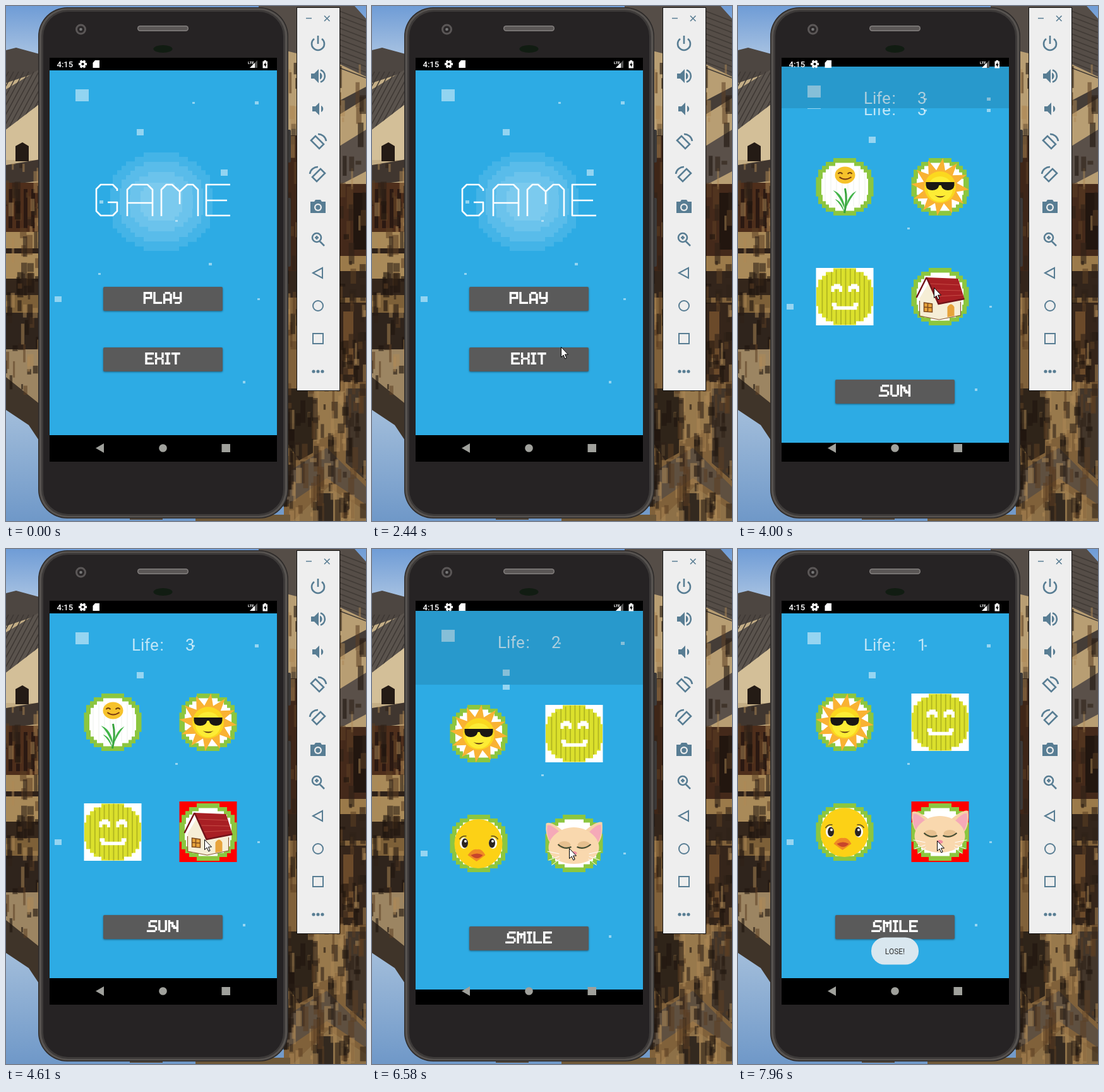
These frames come from a looping animation (570 by 816 pixels, 8 s). An HTML page with a canvas:

```html
<!DOCTYPE html>
<html lang="en">
<head>
<meta charset="utf-8">
<title>Picture game</title>
<style>
html, body { margin: 0; width: 570px; height: 816px; overflow: hidden; }
canvas { display: block; }
</style>
</head>
<body>
<canvas id="stage" width="570" height="816"></canvas>
<script>
const c = document.getElementById('stage').getContext('2d');
const LOOP = 8000;

// ---- drawing helpers ----
function fill(color, path) { c.fillStyle = color; c.fill(new Path2D(path)); }
function line(color, width, path) {
  c.strokeStyle = color; c.lineWidth = width; c.stroke(new Path2D(path));
}
function rect(color, x, y, w, h) { c.fillStyle = color; c.fillRect(x, y, w, h); }
function oval(color, x, y, rx, ry = rx) {
  c.fillStyle = color;
  c.beginPath(); c.ellipse(x, y, rx, ry, 0, 0, 7); c.fill();
}
function round(color, x, y, w, h, r) {
  c.fillStyle = color;
  c.beginPath(); c.roundRect(x, y, w, h, r); c.fill();
}
function text(str, x, y, font, color, align = 'left') {
  c.font = font + ' Roboto, sans-serif';
  c.fillStyle = color; c.textAlign = align; c.fillText(str, x, y);
}
function at(x, y, draw) { c.save(); c.translate(x, y); draw(); c.restore(); }
// disc made of stepped rows
function blocky(color, x, y, rx, ry, step) {
  c.fillStyle = color;
  c.beginPath();
  const rows = Math.round(2 * ry / step), h = 2 * ry / rows;
  for (let i = 0; i < rows; i++) {
    const v = (i + .5) * h / ry - 1;
    const w = Math.min(rx, Math.ceil(rx * Math.sqrt(1 - v * v) / step) * step);
    c.rect(x - w, y - ry + i * h, 2 * w, h + .05);
  }
  c.fill();
}

// ---- pixel lettering: [width in cells, strokes] ----
const GLYPHS = {
  A: [5, 'M0 6V1M1 0H3M4 1V6M0 4H4'], C: [4, 'M3 0H1M0 1V5M1 6H3'],
  E: [5, 'M4 0H0V6H4M0 3H3'], F: [5, 'M4 0H0V6M0 3H3'],
  H: [5, 'M0 0V6M4 0V6M0 3H4'], I: [3, 'M0 0H2M1 0V6M0 6H2'],
  L: [5, 'M0 0V6H4'], M: [5, 'M0 6V0M4 6V0M1 1H3M2 1V3'],
  N: [6, 'M0 6V0M1 1H2V3H3V4H5M5 0V6'], P: [5, 'M0 6V0H4V3H0'],
  S: [6, 'M5 0H2M1 1V2M1 3H4M5 4V5M4 6H0'], T: [5, 'M0 0H4M2 0V6'],
  U: [5, 'M0 0V5M1 6H3M4 0V5'], X: [5, 'M0 0V2M4 0V2M1 3H3M0 4V6M4 4V6'],
  Y: [5, 'M0 0V3H4M4 0V5M3 6H1']
};
function pixelWord(word, cx, top) {
  const cell = 2.6, letters = [...word].map(l => GLYPHS[l]);
  const width = letters.reduce((sum, g) => sum + g[0] + 1, -1);
  at(cx - width * cell / 2 + cell / 2, top + cell / 2, () => {
    c.scale(cell, cell);
    c.lineCap = 'square';
    for (const [w, path] of letters) { line('#fff', 1.3, path); c.translate(w + 1, 0); }
  });
}
function button(word, y, color = '#5a5a5a', lift = 2) {
  c.save();
  c.shadowColor = 'rgba(0,0,0,.45)'; c.shadowBlur = lift * 1.5; c.shadowOffsetY = lift / 2;
  round(color, 154, y, 189, 38, 2);
  c.restore();
  pixelWord(word, 248, y + 8.5);
}

// ---- card pictures, each about 91 x 91 ----
function ring() {
  blocky('#8cc63f', 45.5, 45.5, 45.5, 45.5, 6);
  blocky('#fff', 45.5, 45.5, 37, 38, 5);
}
const CARDS = {
  smile() {
    rect('#fff', 0, 0, 91, 91);
    blocky('#dbe02c', 45.5, 45.5, 45, 45, 6);
    for (let x = 9; x < 86; x += 7.4) {
      const h = Math.sqrt(45 * 45 - (x - 45.5) ** 2);
      rect('rgba(135,140,20,.5)', x, 45.5 - h, 1.8, 2 * h);
    }
    line('#fff', 5, 'M26.5 38V31H31V28H36V31H39V38M53.5 38V31H58V28H63V31H66V38');
    line('#fff', 5.5, 'M25 58H30V63.5H62V58H67');
  },
  duck() {
    ring();
    oval('#fcd116', 45, 46, 38, 39);
    for (const side of [-1, 1]) {
      oval('#fff', 45 + side * 23, 45, 6.5, 9);
      oval('#2a2320', 45 + side * 21.5, 45, 5, 7.5);
      oval('#fff', 46 + side * 21.5, 42, 2);
    }
    line('#5b4a20', 1.5, 'M15 39Q19 33 26 34M65 34Q72 33 76 39');
    fill('#f08a24', 'M28 64Q36 53 43 55Q50 53 56 64Q48 70 42 74Q36 70 28 64Z');
    fill('#c8452b', 'M33 64Q43 59 52 64Q43 74 33 64Z');
  },
  bee() {
    ring();
    line('#222', 2, 'M22 45Q18 36 0 41M20 48Q12 42 1 52M40 72L37 82M52 76L58 82M68 78L76 82');
    fill('rgba(150,205,240,.9)', 'M46 56Q26 20 34 10Q48 4 67 12Q62 38 46 56Z');
    fill('rgba(176,216,243,.9)', 'M50 56Q54 24 72 12Q92 16 91 28Q84 48 50 56Z');
    c.save();
    c.clip(new Path2D('M30 50Q58 42 76 60Q88 78 72 79Q48 84 32 70Z'));
    rect('#f9b81c', 28, 40, 62, 45);
    line('#211c18', 9, 'M35 46L41 82M53 46L58 82M69 50L72 82');
    c.restore();
    oval('#211c18', 26, 57, 14, 15);
    oval('#fff', 20, 54, 4, 5); oval('#211c18', 19, 55, 2, 3);
    line('#fff', 1.2, 'M16 63Q21 68 26 65');
  },
  cat() {
    ring();
    fill('#f6d2a6', 'M1 14Q8 9 28 26H62Q82 9 90 12Q92 36 83 46H8Q-1 32 1 14Z');
    fill('#f5a9b8', 'M3 17Q9 14 23 28Q10 34 8 44Q1 32 3 17ZM88 16Q82 14 69 28Q80 34 83 44Q90 32 88 16Z');
    fill('#f9d8ae', 'M45 20C66 20 85 35 85 52C85 67 66 78 45 78C24 78 5 67 5 52C5 35 24 20 45 20Z');
    oval('#e6c08f', 30, 48, 10, 6); oval('#e6c08f', 61, 48, 10, 6);
    line('#3f4a32', 2.2, 'M20 47Q30 56 41 51M50 51Q61 56 72 47');
    line('#fff', 1, 'M22 62L3 58M22 66L5 72M23 70L10 80M69 62L88 58M69 66L86 72M68 70L81 80');
    oval('#ee8da0', 45, 61, 5, 3);
    oval('#7b4b3a', 45, 69, 2, 2);
  },
  flower() {
    ring();
    for (let i = 14; i < 82; i += 9) rect('rgba(120,140,100,.13)', i, 16, 1, 60);
    line('#37a33c', 3, 'M45 87Q50 66 46 48');
    fill('#42b549', 'M45 74Q41 56 27 51Q37 60 45 80ZM48 74Q52 58 64 52Q54 64 47 80ZM45 86Q41 68 30 65Q38 72 45 86Z');
    oval('#f6c22b', 46, 27, 16, 13.5);
    line('#6b3f12', 2, 'M35 25Q38 21 42 25M50 25Q54 21 57 25');
    line('#7a3a12', 2, 'M37 30Q46 37 56 30');
  },
  sun() {
    ring();
    c.fillStyle = '#f9b233';
    c.beginPath();
    for (let i = 0; i < 24; i++) {
      const a = i * Math.PI / 12 + (i % 2 ? .04 : .1), r = i % 2 ? 27 : 46;
      c.lineTo(45.5 + r * Math.sin(a), 45.5 - r * Math.cos(a));
    }
    c.fill();
    oval('#fbd81f', 45.5, 46, 25); oval('#fdec35', 45.5, 49, 20);
    fill('#1a1714', 'M23 38H68V43Q67 51 58 51Q49 51 47 43H44Q42 51 33 51Q24 51 23 43Z');
    fill('#5b3512', 'M37 59Q46 62 54 59Q46 66 37 59Z');
  },
  house() {
    ring();
    fill('#f6eed6', 'M13 48L28 23L42 48L79 50L78 75L44 82L14 76Z');
    line('#8a5a32', 1.2, 'M13 52V76L44 82L78 75V54');
    fill('#a81f24', 'M24 15L74 17L84 49L43 57Z');
    line('#74151b', 2.5, 'M24 15L43 57L84 49M24 15L8 47');
    line('#c64a44', 1, 'M30 25L77 27M35 35L80 36M39 45L82 43');
    fill('#e7a33a', 'M20 55L33 57V70L20 69ZM57 78V62Q63 53 68 62V76Z');
    line('#7d4a1d', 1.5, 'M20 55L33 57V70L20 69ZM26 56V69M20 62L33 63');
  },
  fish() {
    ring();
    fill('#f7cd22', 'M27 26Q42 12 62 15Q73 19 68 34ZM50 68L73 66L66 80Q57 80 50 68Z');
    oval('#332c16', 50, 21, 2.5); oval('#332c16', 61, 24, 2); oval('#332c16', 40, 24, 2);
    fill('#2f6fbd', 'M66 46Q78 33 91 36Q86 49 90 66Q77 66 66 54Z');
    fill('#3b86d0', 'M2 50Q16 24 42 25Q62 29 73 48Q66 72 42 76Q16 76 2 50Z');
    fill('#94cdf0', 'M33 26Q40 47 33 64L38 62Q48 46 40 25ZM53 30Q56 46 50 62L56 60Q64 48 59 34Z');
    fill('#255a9e', 'M2 54Q18 62 28 75Q10 70 2 54Z');
    oval('#fff', 22, 45, 9); oval('#231d1a', 22, 45, 5.5); oval('#fff', 24, 43, 2);
  }
};
const SLOTS = [[123.5, 229], [274.5, 229], [123.5, 403], [274.5, 403]];

// ---- app pages; hit = [slot, time, colour] ----
const ROUNDS = [null,
  { word: 'CAT', life: 3, cards: ['smile', 'duck', 'bee', 'cat'], hit: [3, 3370, '#0f0'] },
  { word: 'SUN', life: 3, cards: ['flower', 'sun', 'smile', 'house'], hit: [3, 4610, '#f00'] },
  { word: 'FISH', life: 2, cards: ['cat', 'smile', 'fish', 'duck'], hit: [1, 5790, '#f00'] },
  { word: 'SMILE', life: 1, cards: ['sun', 'smile', 'duck', 'cat'], hit: [3, 7270, '#f00'] }
];
const OPENINGS = [2496, 3845, 4932, 6452];
const SPECKS = [[110, 132, 21, 19], [207, 195, 11, 10], [295, 152, 4, 3], [394, 151, 6, 5],
  [268, 339, 4, 3], [77, 460, 11, 9], [398, 463, 4, 3], [375, 594, 4, 4],
  [340, 259, 11, 10], [148, 308, 6, 5], [321, 407, 5, 4], [146, 423, 4, 3]];

function menu(t) {
  for (const r of [81, 66, 50, 33]) blocky('rgba(255,255,255,.11)', 246, 310, r, r - 3, 7);
  for (const s of SPECKS) rect('rgba(255,255,255,.48)', ...s);
  c.lineJoin = 'round';
  line('#fff', 2.6, 'M176 293V290L169 283H150L143 290V325L150 332H169L176 325V311H161' +
    'M192 333V291L200 283H224L232 291V333M192 312H232' +
    'M246 333V291L254 283H263L275 294V314M275 294L287 283H296L304 291V333' +
    'M355 283H317V332H355M317 308H350');
  c.lineJoin = 'miter';
  if (t >= 1440 && t < 1680) button('PLAY', 445, '#707070', 6);
  else button('PLAY', 445, t >= 1680 && t < 1830 ? '#646464' : undefined);
  button('EXIT', 541);
}
function game(round, t) {
  const ink = 'rgba(255,255,255,.7)';
  for (const s of SPECKS.slice(0, 8)) rect('rgba(255,255,255,.5)', ...s);
  text('Life', 199, 161, '26px', ink);
  text(':', 243.5, 161, '26px', ink);
  text(round.life, 284, 161, '26px', ink);
  round.cards.forEach((name, i) => {
    const [x, y] = SLOTS[i], [slot, time, color] = round.hit;
    if (slot === i && t >= time) rect(color, x, y - 3, 91, 96);
    at(x, y, CARDS[name]);
  });
  button(round.word, 580);
}
function page(i, t) {
  rect('#2dabe4', 69, 102, 360, 578);
  i ? game(ROUNDS[i], t) : menu(t);
}

// y of the cubic curve (a,0) (b,1) at x
function ease(x, a, b) {
  let lo = 0, hi = 1;
  for (let i = 0; i < 20; i++) {
    const s = (lo + hi) / 2, r = 1 - s;
    if (3 * a * s * r * r + 3 * b * s * s * r + s * s * s < x) lo = s; else hi = s;
  }
  return lo * lo * (3 - 2 * lo);
}
function app(t) {
  const i = OPENINGS.filter(o => o <= t).length;
  const age = t - OPENINGS[i - 1];
  const p = i ? ease(Math.min(1, age / 425), .4, .2) : 1;
  c.save();
  c.beginPath(); c.rect(69, 82, 360, 640); c.clip();
  if (p > .975) page(i, t);
  else {
    at(0, -Math.round(12 * p), () => {
      page(i - 1, t);
      rect(`rgba(0,0,0,${.106 * Math.min(1, age / 117)})`, 69, 102, 360, 578);
    });
    const dy = Math.round(26 * (1 - p));
    const shown = ease(Math.min(1, age / 294), .2, 0);
    const top = Math.round(82 + dy + 614 * (1 - shown));
    c.beginPath(); c.rect(69, top, 360, 722 - top); c.clip();
    at(0, dy, () => page(i, t));
  }
  c.restore();
}

// ---- surroundings ----
// seeded upright streaks of weathered wood, plaster and rippled water
function weather(x, y, w, h, count) {
  let seed = x * 7 + y;
  const rnd = () => (seed = (seed * 16807 + 11) % 2147483647) / 2147483647;
  const tones = ['rgba(30,20,14,.6)', 'rgba(92,62,36,.55)', 'rgba(176,138,86,.5)', 'rgba(48,34,24,.6)'];
  c.save();
  c.beginPath(); c.rect(x, y, w, h); c.clip();
  for (let i = 0; i < count; i++)
    rect(tones[i % 4], x + rnd() * w - 4, y + rnd() * h - 12, 3 + rnd() * 8, 6 + rnd() * 34);
  c.restore();
}
function backdrop() {
  const sky = c.createLinearGradient(0, 0, 0, 816);
  sky.addColorStop(0, '#6f9cd6'); sky.addColorStop(.1, '#aac4e2');
  sky.addColorStop(.78, '#a3bedb'); sky.addColorStop(1, '#6f98c8');
  rect(sky, 0, 0, 570, 816);
  // left houses and their reflection
  fill('#c4ae86', 'M0 100L60 88V440H0Z');
  fill('#4d4641', 'M0 70L16 66L60 78V102L0 122Z');
  fill('#5a534d', 'M0 132L60 96V150L0 196Z');
  for (let x = -50; x < 60; x += 8) line('#3d3733', 1.5, `M${x + 46} 104L${x} 190`);
  fill('#d3bf98', 'M0 196L60 150V244H0Z');
  fill('#241b15', 'M15 222L26 216L36 222V246H15Z');
  fill('#40362f', 'M0 252L60 242V276L0 284Z');
  rect('#4e2e1b', 0, 280, 60, 80);
  for (let x = 4; x < 60; x += 12) rect('#2b1912', x, 290, 6, 62);
  rect('#a98a59', 0, 358, 60, 74);
  rect('#2e2119', 0, 384, 60, 8);
  rect('#34261b', 0, 432, 60, 26); rect('#7d6038', 0, 458, 60, 30);
  rect('#2f241c', 0, 486, 60, 66);
  fill('#9c8562', 'M0 544H60V650L0 610Z');
  fill('#3f3429', 'M0 588L60 636V700L36 664L0 640Z');
  weather(0, 250, 60, 366, 80);
  // right houses and their reflection
  fill('#b89e73', 'M400 70H570V440H400Z');
  fill('#554d47', 'M400 0H552L570 20V112L528 92L400 60Z');
  for (let y = 8; y < 100; y += 9) line('#403a35', 1.5, `M528 ${y}L570 ${y + 16}`);
  fill('#453d37', 'M528 150L570 128V146L528 172Z');
  fill('#5a5049', 'M528 222L570 196V262L528 284Z');
  rect('#3e2618', 440, 205, 22, 225); rect('#44291a', 528, 282, 42, 118);
  rect('#22160f', 550, 296, 20, 90);
  rect('#9b7a4a', 528, 396, 42, 24); rect('#33251b', 440, 420, 130, 42);
  rect('#80613a', 440, 462, 130, 354);
  rect('#35251a', 528, 470, 42, 126); rect('#6b4a2a', 534, 484, 16, 100);
  fill('#2f2419', 'M444 606H486V708L464 720L444 690Z');
  fill('#98794c', 'M488 610H536V672L488 690Z');
  fill('#43362a', 'M538 606H570V752L538 724Z');
  fill('#5f5040', 'M440 742L508 700L570 762V790L508 748L440 794Z');
  fill('#8d7047', 'M454 816L510 762L570 800V816Z');
  fill('#33291f', 'M492 772H518V816H492Z');
  weather(440, 90, 130, 350, 90);
  weather(430, 440, 140, 376, 240);
  rect('#57493a', 196, 809, 52, 5); rect('#6e5838', 300, 806, 150, 10);
}
function phone() {
  round('#3b3938', 444, 196, 7, 52, 2); round('#3b3938', 444, 304, 7, 109, 2);
  round('#2d2a29', 51, 2, 396, 810, 46);
  round('#575350', 52.5, 3.5, 393, 807, 45);
  round('#3d3a39', 56, 6, 386, 802, 42);
  round('#262324', 59, 9, 380, 796, 39);
  oval('#5b5757', 118.5, 37, 8.5); oval('#2a2728', 118.5, 37, 5.5); oval('#777', 118.5, 37, 2.3);
  round('#827e7d', 208, 31, 81, 9, 4.5); round('#5b5756', 209.5, 32.5, 78, 6, 3);
  oval('#111c12', 248.5, 68, 15, 6);
  rect('#000', 69, 82, 360, 640);
}
function bars() {
  text('4:15', 80.5, 97, '500 13px', '#fff');
  at(121.5, 92, () => {
    for (let i = 0; i < 3; i++) { rect('#fff', -6.5, -1.8, 13, 3.6); c.rotate(Math.PI / 3); }
    oval('#fff', 0, 0, 4.8); oval('#000', 0, 0, 2.1);
  });
  fill('#fff', 'M141 86H148V98H137.5V90Z');
  text('LTE', 383, 91.5, '700 6px', '#fff');
  fill('#555', 'M386 98H398V86Z'); fill('#fff', 'M386 98H394V90Z');
  fill('#fff', 'M408.5 86H412V87.5H414V98.5H406.5V87.5H408.5Z');
  fill('#000', 'M411 89L408 94H410V97L412.8 92.2H411Z');
  fill('#a0a19c', 'M142 700.5L155 693V708Z');
  oval('#a0a19c', 248.5, 700.5, 6.3); rect('#a0a19c', 341.5, 694, 13.5, 13);
}

// toolbar icons: [y, stroked path, filled path]
const ICONS = [
  [59, 'M-6-7A10 10 0 1 0 6-7M0-12V1', ''],
  [111, 'M4-9.5A10 10 0 0 1 4 9.5', 'M-11-4H-6L1-11V11L-6 4H-11ZM3-5.5A6 6 0 0 1 3 5.5Z'],
  [163, '', 'M-9-4H-4L2-10V10L-4 4H-9ZM5-5A5.5 5.5 0 0 1 5 5Z'],
  [215, 'M-11-2L-4-9L9 4L2 11ZM0-12A13 13 0 0 1 13-1', ''],
  [267, 'M11-2L4-9L-9 4L-2 11ZM0-12A13 13 0 0 0-13-1', ''],
  [318, '', 'M-12-8H-6L-4-11H4L6-8H12V10H-12Z'],
  [370, 'M5-3A7 7 0 1 0-9-3A7 7 0 1 0 5-3M3 3L10 10M-2-6V0M-5-3H1', ''],
  [423, 'M-8 0L7-8V8Z', ''],
  [475, 'M8 0A8 8 0 1 0-8 0A8 8 0 1 0 8 0', ''],
  [527, 'M-8-8H8V8H-8Z', ''],
  [579, '', '']
];
function toolbar() {
  const ink = '#587d93';
  rect('#111', 460, 2, 69, 608); rect('#eee', 461, 3, 67, 606);
  line(ink, 1.6, 'M475 19.5H484M504 15.5L512.5 24M512.5 15.5L504 24');
  for (const [y, stroke, solid] of ICONS)
    at(494, y, () => { line(ink, y > 400 ? 2 : 2.6, stroke); fill(ink, solid); });
  oval('#eee', 494, 319, 6); oval(ink, 494, 319, 3.7);
  for (const x of [487, 494, 501]) oval(ink, x, 579, 2.6);
}

// ---- pointer: [time, x, y] ----
const MOVES = [[280, 381, 680], [660, 275, 473], [1830, 275, 473], [2438, 299, 540],
  [2590, 299, 540], [2990, 309, 441], [3920, 309, 441], [4230, 314, 460], [5160, 314, 460],
  [5388, 299, 448], [5540, 310, 285], [5867, 310, 285], [6100, 314, 493], [6270, 314, 493],
  [6573, 312, 474], [6800, 314, 462], [7040, 315, 462], [LOOP, 315, 462]];
function pointer(t) {
  if (t < 280) return;
  const i = MOVES.findIndex(m => m[0] > t);
  const [t0, x0, y0] = MOVES[i - 1], [t1, x1, y1] = MOVES[i], k = (t - t0) / (t1 - t0);
  at(Math.round(x0 + (x1 - x0) * k) + .5, Math.round(y0 + (y1 - y0) * k) + .5, () => {
    const arrow = 'M0 0V16L3.6 12.6L6.2 18.5L8.6 17.5L6 11.6H11Z';
    fill('#fff', arrow); line('#000', 1, arrow);
  });
}
function toast(t) {
  if (t < 7570) return;
  c.save();
  c.globalAlpha = Math.min(1, (t - 7500) / 460);
  round('#d9e7ef', 211, 615.5, 75, 43, 21);
  text('LOSE!', 248.5, 641.5, '12px', '#333', 'center');
  c.restore();
}

// the screen refreshes in bursts: [first, last, steps]
const BURSTS = [[280, 660, 6], [1440, 1440, 1], [1680, 1680, 1], [1830, 2590, 11],
  [2670, 2990, 5], [3370, 3540, 3], [3920, 4230, 5], [4610, 4610, 1], [5160, 5540, 6],
  [5790, 6100, 5], [6270, 6800, 8], [7040, 7040, 1], [7270, 7270, 1], [7570, 7960, 6]];
function refreshTime(t) {
  const burst = BURSTS.filter(b => b[0] <= t).pop();
  if (!burst) return 0;
  const [first, last, steps] = burst;
  if (t >= last) return last;
  const gap = (last - first) / (steps - 1);
  return first + Math.floor((t - first + 3) / gap) * gap;
}

function frame(now) {
  const t = refreshTime(now % LOOP);
  backdrop();
  phone();
  app(t);
  bars();
  toolbar();
  toast(t);
  pointer(t);
  requestAnimationFrame(frame);
}
requestAnimationFrame(frame);
</script>
</body>
</html>
```
